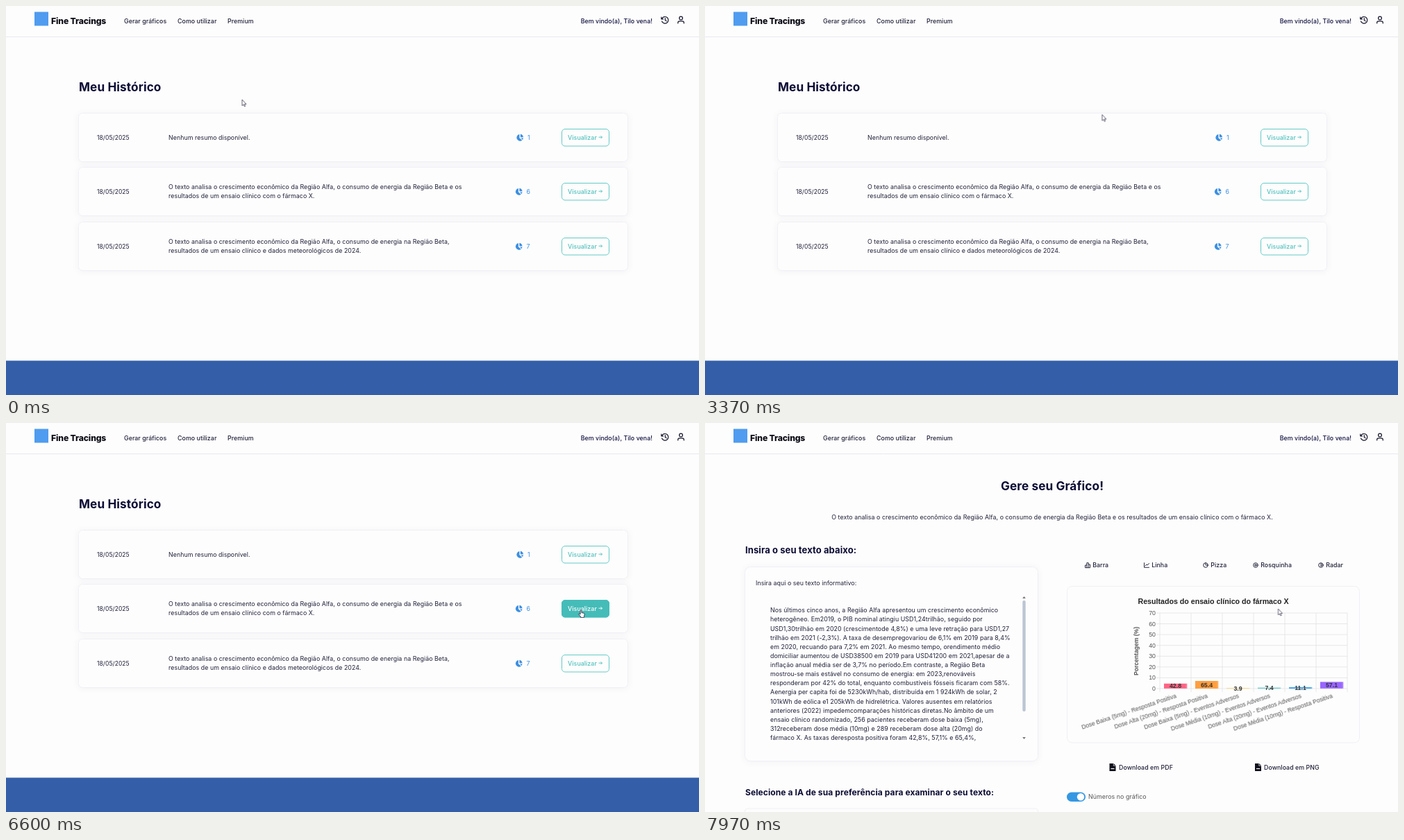
Animation of 998 by 561 pixels, one loop 8000 ms. Source, as an HTML page:

```html
<!DOCTYPE html>
<html lang="pt">
<head>
<meta charset="utf-8">
<title>Meu Histórico</title>
<style>
html, body { margin: 0; width: 100%; height: 100%; overflow: hidden; background: #fdfdfd; }
svg { display: block; width: 998px; height: 561px; font: 400 8.8px Inter, "Open Sans", sans-serif; letter-spacing: .066px; fill: #20203a; }
.mid { text-anchor: middle; }
.end { text-anchor: end; }
.m { font-weight: 500; }
.b { font-weight: 700; fill: #0c0c35; letter-spacing: .1px; }
.line { fill: none; stroke: #15152c; stroke-width: 1.2; stroke-linecap: round; stroke-linejoin: round; }
.card { fill: #fdfdfd; stroke: #f0f0f6; stroke-width: 1; }
.soft { filter: drop-shadow(0 1px 4px #2222660e); }
.btn rect { fill: #fdfdfd; stroke: #65cac7; }
.btn { fill: #4fc0bd; }
.btn path { fill: none; stroke: #4fc0bd; stroke-width: .9; }
.count { fill: #3c8fe2; }
.chart { font-family: "Liberation Sans", Arial, sans-serif; letter-spacing: 0; fill: #555; }

.list, .form, .before, .after, .user, .arrow, .hand { animation: 8s step-end infinite; }
.list { animation-name: list; }
.form { animation-name: form; }
.before { animation-name: before; }
.after { animation-name: after; }
.user { animation-name: user; }
.arrow { animation-name: arrow; }
.hand { animation-name: hand; }
.shift { animation: shift 8s step-end infinite; }
.hover { animation: hover 8s linear infinite; }
.cursor { animation: move 8s linear infinite; }
.bar { transform-box: fill-box; transform-origin: bottom; animation: grow 8s linear infinite; }
.value { animation: lift 8s linear infinite; }

@keyframes list { 0% { visibility: visible } 90%, 100% { visibility: hidden } }
@keyframes form { 0% { visibility: hidden } 90%, 100% { visibility: visible } }
@keyframes before { 0% { opacity: 1 } 99.25%, 100% { opacity: 0 } }
@keyframes after { 0% { opacity: 0 } 99.25%, 100% { opacity: 1 } }
@keyframes shift { 0% { transform: none } 99.25%, 100% { transform: translateY(13px) } }
@keyframes user { 0% { opacity: 1 } 90% { opacity: 0 } 95.5%, 100% { opacity: 1 } }
@keyframes arrow { 0% { opacity: 1 } 49.5% { opacity: 0 } 90%, 100% { opacity: 1 } }
@keyframes hand { 0% { opacity: 0 } 49.5% { opacity: 1 } 90%, 100% { opacity: 0 } }
@keyframes hover { 0%, 49.5% { opacity: 0 } 52%, 100% { opacity: 1 } }
@keyframes move {
  0%, 36.6% { transform: translate(340px, 135px) }
  42.1% { transform: translate(570.5px, 156px) }
  48.5% { transform: translate(795px, 252px) }
  51.5%, 56% { transform: translate(827px, 271px) }
  57.1%, 89.99% { transform: translate(828px, 269px) }
  90%, 100% { transform: translate(825.5px, 268px) }
}
@keyframes grow { 0%, 99.25% { transform: scaleY(0) } 99.6%, 100% { transform: scaleY(.108) } }
@keyframes lift { 0%, 99.25% { transform: none } 99.6%, 100% { transform: translateY(var(--lift)) } }
</style>
</head>
<body>
<svg viewBox="0 0 998 561">
  <defs>
    <g id="pie">
      <path d="M-.6-4.8A4.9 4.9 0 1 0 3.3 3.9L-.6.4Z"/>
      <path d="M.9-5A5 5 0 0 1 5-.6H.9Z"/>
      <path d="M1.4.8H5A5 5 0 0 1 4 3.2Z"/>
    </g>
    <g id="file">
      <path d="M-4.5-5.5H1.5L4.5-2.5V5.5H-4.5Z" fill="#10101c"/>
      <path d="M1.3-5.3V-2.3H4.3" fill="none" stroke="#fff" stroke-width=".7"/>
      <path d="M-2.5 2H2.5" stroke="#fff" stroke-width="1.2"/>
    </g>
  </defs>

  <g class="list">
    <text class="b" x="105" y="123.3" font-size="17.2">Meu Histórico</text>
    <g id="rows"></g>
    <rect y="511.5" width="998" height="50" fill="#345fa8"/>
  </g>

  <g class="form">
    <text class="b mid" x="500" y="97" font-size="17.2">Gere seu Gráfico!</text>
    <text class="after mid" x="500" y="139.3">O texto analisa o crescimento econômico da Região Alfa, o consumo de energia da Região Beta e os resultados de um ensaio clínico com o fármaco X.</text>
    <g class="shift">
      <text class="b" x="58" y="175.3" font-size="13">Insira o seu texto abaixo:</text>
      <rect class="card soft" x="57.5" y="194.5" width="422" height="280" rx="8"/>
      <text x="73" y="220.8">Insira aqui o seu texto informativo:</text>
      <text class="b" x="58" y="524.3" font-size="12">Selecione a IA de sua preferência para examinar o seu texto:</text>
      <rect class="card" x="57.5" y="543" width="422" height="30" rx="4"/>
      <g class="before"><path class="line" d="M472.5 553L474.5 555L476.5 553" style="stroke-width:.9"/></g>
    </g>
    <g class="after">
      <g id="essay"></g>
      <rect x="457.3" y="256" width="4.4" height="160" rx="2" fill="#bcc5d3"/>
      <path d="M457.2 253L459.5 250L461.8 253ZM457.2 453L459.5 456L461.8 453Z" fill="#777"/>
      <g class="m" id="tabs"></g>
      <rect class="card" x="521.5" y="235.5" width="421" height="225.5" rx="7"/>
      <g class="chart" id="chart"></g>
      <use href="#file" x="587" y="496.5"/><text class="m" x="596" y="499.8">Download em PDF</text>
      <use href="#file" x="796.5" y="496.5"/><text class="m" x="805" y="499.8">Download em PNG</text>
      <rect x="521" y="532.5" width="27" height="13.5" rx="6.75" fill="#3598e3"/>
      <circle cx="541" cy="539.2" r="5.2" fill="#fff"/>
      <text x="552" y="542.4" fill="#555">Números no gráfico</text>
    </g>
  </g>

  <path d="M0 44.5H998" stroke="#e8e8f1"/>
  <rect x="41" y="8.5" width="20" height="20" fill="#4f9cf0"/>
  <text x="65" y="25.8" font-size="12.2" font-weight="800" fill="#0a0a14" letter-spacing="-.15">Fine Tracings</text>
  <g class="m">
    <text x="170" y="25">Gerar gráficos</text>
    <text x="247" y="25">Como utilizar</text>
    <text x="319" y="25">Premium</text>
  </g>
  <g class="user">
    <text class="m end" x="931" y="25" fill="#101040">Bem vindo(a), Tilo vena!</text>
    <path class="line" d="M944.6 18.4A4.8 4.8 0 1 1 944.5 22M943.8 16V18.8H946.5M949.3 17.6V20.6L951.2 21.8"/>
    <circle class="line" cx="972" cy="17.6" r="2.4"/>
    <path class="line" d="M967.7 25V24Q967.7 21.8 970 21.8H974Q976.3 21.8 976.3 24V25"/>
  </g>

  <g class="cursor">
    <path class="arrow" d="M0 0V8.8L2 7L3.4 10L4.7 9.4L3.4 6.5H6Z" fill="#fff" stroke="#55556a" stroke-width=".9"/>
    <path class="hand" d="M-.9 1Q0-.4 .9 1V4.6L4.2 5.2Q5.3 5.5 5.2 7L4.6 9.4V11.4H-.6V10L-3.4 6.8Q-3.2 5.4-1.9 6L-.9 7Z" fill="#fff" stroke="#33334a" stroke-width=".9"/>
  </g>
</svg>
<script>
const put = (id, markup) => { document.getElementById(id).innerHTML = markup; };
const label = (x, y, text, attrs = '') => `<text x="${x}" y="${y}" ${attrs}>${text}</text>`;

const intro = 'O texto analisa o crescimento econômico da Região Alfa, o consumo de energia ';
const rows = [
  { y: 189.5, count: 1, x: 740, lines: ['Nenhum resumo disponível.'] },
  { y: 267.5, count: 6, x: 738.5, lines: [intro + 'da Região Beta e os', 'resultados de um ensaio clínico com o fármaco X.'] },
  { y: 346.5, count: 7, x: 738.5, lines: [intro + 'na Região Beta,', 'resultados de um ensaio clínico e dados meteorológicos de 2024.'] }
];

const button = (y, hot) => {
  const ink = hot ? '#fff' : '#4fc0bd';
  const box = hot ? 'style="fill:#45bcb8;stroke:#45bcb8"' : '';
  return `<g class="btn m ${hot ? 'hover' : ''}">
    <rect x="800.5" y="${y - 12}" width="68" height="24.5" rx="4.5" ${box}/>
    ${label(809, y + 3.2, 'Visualizar', `fill="${ink}"`)}
    <path d="M853.5 ${y - .3}h5m-2-2l2 2l-2 2" style="stroke:${ink}"/></g>`;
};

put('rows', rows.map(({ y, count, x, lines }, i) => `
  <rect class="card soft" x="104.5" y="${y - 35}" width="791" height="70" rx="6"/>
  ${label(131, y + 3.1, '18/05/2025', 'font-size="8.5"')}
  ${lines.map((line, n) => label(234, y + 3.1 + (n - (lines.length - 1) / 2) * 13.2, line)).join('')}
  <g class="count"><use href="#pie" x="${x}" y="${y + .3}"/>${label(x + 11, y + 3.2, count)}</g>
  ${button(y)}${i === 1 ? button(y, true) : ''}`).join(''));

const essay = `Nos últimos cinco anos, a Região Alfa apresentou um crescimento econômico
heterogêneo. Em2019, o PIB nominal atingiu USD1,24trilhão, seguido por
USD1,30trilhão em 2020 (crescimentode 4,8%) e uma leve retração para USD1,27
trilhão em 2021 (-2,3%). A taxa de desempregovariou de 6,1% em 2019 para 8,4%
em 2020, recuando para 7,2% em 2021. Ao mesmo tempo, orendimento médio
domiciliar aumentou de USD38500 em 2019 para USD41200 em 2021,apesar de a
inflação anual média ser de 3,7% no período.Em contraste, a Região Beta
mostrou-se mais estável no consumo de energia: em 2023,renováveis
responderam por 42% do total, enquanto combustíveis fósseis ficaram com 58%.
Aenergia per capita foi de 5230kWh/hab, distribuída em 1 924kWh de solar, 2
101kWh de eólica e1 205kWh de hidrelétrica. Valores ausentes em relatórios
anteriores (2022) impedemcomparações históricas diretas.No âmbito de um
ensaio clínico randomizado, 256 pacientes receberam dose baixa (5mg),
312receberam dose média (10mg) e 289 receberam dose alta (20mg) do
fármaco X. As taxas deresposta positiva foram 42,8%, 57,1% e 65,4%,`;
put('essay', essay.split('\n').map((line, i) => label(94, 273.3 + i * 13.13, line)).join(''));

const ring = '<circle r="3.3"/>';
const tabs = [
  [551, 'Barra', '<path d="M-3.5 3.3V0H-1.2V-3.3H1.2V-1H3.5V3.3ZM-1.2 0V3.3M1.2-1V3.3"/>'],
  [636, 'Linha', '<path d="M-3.5-3.3V3.3H3.5M-2 1L0-1L1.2 0L3.5-2.5"/>'],
  [721, 'Pizza', ring + '<path d="M0-3.3V0H3.3"/>'],
  [793, 'Rosquinha', ring + '<circle r="1.3"/>'],
  [887, 'Radar', ring + '<path d="M0-2V2L1.8 0Z"/>']
];
put('tabs', tabs.map(([x, name, icon]) =>
  `<g class="line" style="stroke-width:.9" transform="translate(${x} 205)">${icon}</g>` +
  label(x + 7.2, 207.8, name)).join(''));

const bars = [
  ['Dose Baixa (5mg) - Resposta Positiva', 42.8, '#ff6384'],
  ['Dose Alta (20mg) - Resposta Positiva', 65.4, '#ff9f40'],
  ['Dose Baixa (5mg) - Eventos Adversos', 3.9, '#ffcd56'],
  ['Dose Média (10mg) - Eventos Adversos', 7.4, '#4bc0c0'],
  ['Dose Alta (20mg) - Eventos Adversos', 11.1, '#36a2eb'],
  ['Dose Média (10mg) - Resposta Positiva', 57.1, '#9966ff']
];
const base = 383, unit = 109 / 70, step = 45;
let chart = label(732, 260.8, 'Resultados do ensaio clínico do fármaco X', 'class="mid" font-size="10.65" font-weight="700" fill="#222"')
  + label(0, 0, 'Porcentagem (%)', 'class="mid" font-size="8.6" font-weight="700" transform="translate(624 329) rotate(-90)"');
for (let v = 0; v <= 70; v += 10) {
  const y = base - v * unit;
  chart += `<path d="M650 ${y}H925" stroke="#e3e3e6" stroke-width=".8"/>` + label(649, y + 3, v, 'class="end" font-size="8.8"');
}
for (let i = 0; i <= bars.length; i++)
  chart += `<path d="M${655 + i * step} 274V388" stroke="#e3e3e6" stroke-width=".8"/>`;
bars.forEach(([name, value, color], i) => {
  const x = 677.5 + i * step, h = value * unit;
  chart += `<rect class="bar" x="${x - 16.5}" y="${base - h}" width="33" height="${h}" fill="${color}"/>`
    + label(x, base + 3, value, `class="value mid" font-size="8.8" font-weight="700" fill="#333" style="--lift:${-h * .054}px"`)
    + label(0, 0, name, `class="end" font-size="8.5" transform="translate(${x + 2} 396) rotate(-18.6)"`);
});
put('chart', chart);
</script>
</body>
</html>
```
